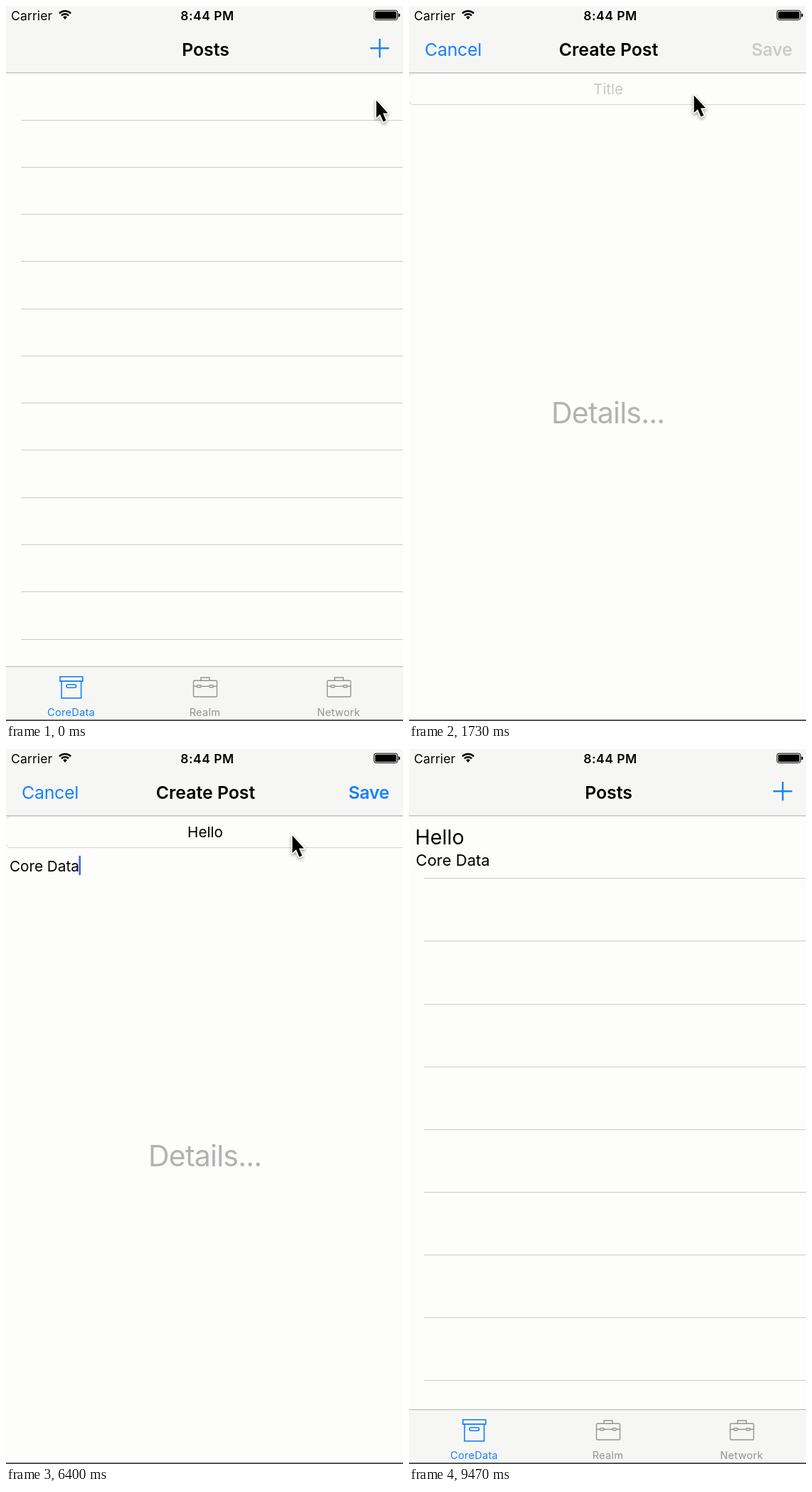
Write an HTML page with a canvas that moves like this. It is 558 px wide and 1004 px high and loops after 9540 ms.

```html
<!DOCTYPE html>
<html lang="en">
<head>
<meta charset="utf-8">
<title>Create a post</title>
<style>
  html, body { margin: 0; width: 100%; height: 100%; overflow: hidden; background: #fdfdfb; }
  canvas { display: block; width: 558px; height: 1004px; }
</style>
</head>
<body>
<canvas id="stage"></canvas>
<script>
const W = 558, H = 1004, LOOP = 9540, FPS = 0.015;
const BLUE = '#1780f8', GRAY = '#939393', BAR = '#f6f6f5', PAGE = '#fdfdfb', LINE = '#cbcbcd';
const OPEN = 752, CLOSE = 8250, TITLE_FOCUS = 2100, BODY_FOCUS = 4350;
const TITLE = { text: 'Hello', keys: [2900, 3150, 3350, 3550, 3780] };
const BODY = { text: 'Core Data', keys: [4750, 4950, 5120, 5280, 5420, 5600, 5720, 5830, 5930] };

// Pointer stops: time, x, y
const PATH = [
  [0, 520, 132], [150, 520, 132], [560, 524, 61], [1100, 524, 61], [1680, 400, 125],
  [2300, 402, 121], [6800, 402, 121], [7500, 510, 76], [8750, 510, 76], [9250, 590, 100]
];

const canvas = document.getElementById('stage');
const dpr = window.devicePixelRatio || 1;
canvas.width = W * dpr;
canvas.height = H * dpr;
const c = canvas.getContext('2d');

function text(str, x, y, size, { color = '#000', weight = 400, align = 'left', gap = 0 } = {}) {
  c.font = `${weight} ${size}px Inter, "Liberation Sans", sans-serif`;
  c.letterSpacing = gap * size + 'px';
  c.textAlign = align;
  c.fillStyle = color;
  c.fillText(str, x, y);
  return c.measureText(str).width;
}

function rect(x, y, w, h, color) {
  c.fillStyle = color;
  c.fillRect(x, y, w, h);
}

function box(x, y, w, h, r) {
  c.beginPath();
  c.roundRect(x, y, w, h, r);
}

function pen(color, width) {
  c.strokeStyle = color;
  c.lineWidth = width;
}

function segment(x1, y1, x2, y2) {
  c.beginPath();
  c.moveTo(x1, y1);
  c.lineTo(x2, y2);
  c.stroke();
}

function navTitle(str) {
  text(str, 280.5, 70, 24.8, { weight: 600, align: 'center' });
}

function statusBar() {
  text('Carrier', 7, 19.5, 17.5, { gap: 0.008 });
  text('8:44 PM', 283, 19.5, 17.5, { weight: 600, align: 'center', gap: 0.028 });
  pen('#000', 2.4);
  for (const r of [7.2, 11.4]) {
    c.beginPath();
    c.arc(83, 18.4, r, -Math.PI * 0.75, -Math.PI * 0.25);
    c.stroke();
  }
  c.fillStyle = '#000';
  c.beginPath();
  c.moveTo(83, 19);
  c.arc(83, 18.4, 4, -Math.PI * 0.75, -Math.PI * 0.25);
  c.fill();
  pen('#000', 1);
  box(517.2, 6.2, 33.3, 13.3, 3);
  c.stroke();
  box(518.8, 7.8, 30, 10.2, 1.5);
  c.fill();
  box(551.6, 10.4, 2.2, 5.2, [0, 2, 2, 0]);
  c.fill();
}

function archiveIcon() {
  pen(BLUE, 1.6);
  c.strokeRect(75.8, 941.8, 32, 6.4);
  c.strokeRect(78, 948.2, 27.6, 23.6);
  box(85, 952.8, 13.6, 4.4, 2.2);
  c.stroke();
}

function toolboxIcon(x) {
  pen(GRAY, 1.4);
  box(x - 16.5, 947.2, 33, 22.8, 1.5);
  c.stroke();
  c.beginPath();
  c.moveTo(x - 6, 947);
  c.lineTo(x - 6, 943);
  c.lineTo(x + 6, 943);
  c.lineTo(x + 6, 947);
  c.stroke();
  segment(x - 16.5, 955.3, x - 11.5, 955.3);
  segment(x - 6, 955.3, x + 6, 955.3);
  segment(x + 11.5, 955.3, x + 16.5, 955.3);
  for (const dx of [-11.5, 6]) {
    box(x + dx, 953.8, 5.5, 3, 1.2);
    c.stroke();
  }
}

function tabBar() {
  rect(0, 927, W, 77, BAR);
  rect(0, 927, W, 1.2, '#bdbdbd');
  archiveIcon();
  toolboxIcon(280);
  toolboxIcon(468);
  const tab = (name, x, color) => text(name, x, 997, 14.6, { color, align: 'center', gap: 0.018 });
  tab('CoreData', 91.5, BLUE);
  tab('Realm', 279.5, GRAY);
  tab('Network', 467.5, GRAY);
}

function listPage(saved) {
  rect(0, 0, W, H, PAGE);
  rect(0, 0, W, 94, BAR);
  rect(0, 93.2, W, 1.2, '#b8b8b8');
  navTitle('Posts');
  pen(BLUE, 2.4);
  segment(512, 59.3, 538.5, 59.3);
  segment(525.3, 46, 525.3, 72.5);

  const first = saved ? 181.3 : 159.6, step = saved ? 88.1 : 66.27;
  for (let y = first; y < 926; y += step) rect(21, Math.round(y), W, 1, LINE);
  if (saved) {
    text('Hello', 8.5, 134, 28.7);
    text('Core Data', 9.6, 164, 22);
  }
  tabBar();
}

const typed = (entry, t) => entry.text.slice(0, entry.keys.filter(k => k <= t).length);

function caretAlpha(t) {
  const events = [TITLE_FOCUS, BODY_FOCUS, ...TITLE.keys, ...BODY.keys].filter(k => k <= t);
  const u = (t - Math.max(...events)) % 1000;
  if (u < 500) return 1;
  if (u < 700) return (700 - u) / 200;
  return u < 850 ? 0 : (u - 850) / 150;
}

function caret(x, y, t) {
  c.globalAlpha = caretAlpha(t);
  rect(x, y, 2.6, 27, '#4468dc');
  c.globalAlpha = 1;
}

function createPage(t) {
  const title = typed(TITLE, t), body = typed(BODY, t);
  rect(0, -2, W, H + 2, PAGE);
  rect(0, -2, W, 96, BAR);
  rect(0, 93.2, W, 1.2, '#b8b8b8');
  text('Cancel', 22, 70, 24.8, { color: BLUE, gap: -0.008 });
  navTitle('Create Post');
  text('Save', 538.5, 70, 24.8, {
    color: body ? BLUE : '#cbcbcb', weight: 600, align: 'right', gap: -0.014
  });

  pen('#d6d6d6', 1);
  box(-0.5, 94.5, 568, 44, 7);
  c.stroke();
  const titleWidth = text(title || 'Title', 280, 123.7, 20.7, {
    color: title ? '#000' : '#c6c6c9', align: 'center'
  });
  text('Details...', 279.6, 586, 41, { color: '#b2b2b3', align: 'center', gap: -0.019 });
  const bodyWidth = text(body, 5, 171.7, 20.7);

  if (t >= BODY_FOCUS) caret(4.5 + bodyWidth, 150, t);
  else if (t >= TITLE_FOCUS) caret(279 + (title ? titleWidth / 2 : 0), 102, t);
}

// Critically damped spring: 1 at rest, falling to 0
function spring(ms) {
  const x = Math.max(0, ms) * 0.018;
  return (1 + x) * Math.exp(-x);
}

function pageOffset(t) {
  return H * (t < CLOSE ? spring(t - OPEN) : 1 - spring(t - CLOSE));
}

function pointerAt(t) {
  const i = PATH.findIndex(p => p[0] > t);
  if (i < 0) return PATH[PATH.length - 1].slice(1);
  const [t0, x0, y0] = PATH[i - 1], [t1, x1, y1] = PATH[i];
  const u = (t - t0) / (t1 - t0), e = u * u * (3 - 2 * u);
  return [x0 + (x1 - x0) * e, y0 + (y1 - y0) * e];
}

function pointer(t) {
  const [x, y] = pointerAt(t);
  if (x > W) return;
  c.save();
  c.translate(x, y);
  c.beginPath();
  c.moveTo(0.5, 0.5);
  for (const [px, py] of [[0.5, 25], [5.8, 20], [10.2, 30.5], [14.2, 28.8], [9.8, 18.6], [16.8, 18.4]]) {
    c.lineTo(px, py);
  }
  c.closePath();
  c.lineJoin = 'round';
  c.shadowColor = 'rgba(0,0,0,.4)';
  c.shadowBlur = 4 * dpr;
  c.shadowOffsetY = 2 * dpr;
  pen('#fff', 3.4);
  c.stroke();
  c.shadowColor = 'transparent';
  c.fillStyle = '#000';
  c.fill();
  c.restore();
}

function draw(t) {
  c.setTransform(dpr, 0, 0, dpr, 0, 0);
  listPage(t >= CLOSE);
  const y = pageOffset(t);
  if (y < H - 1) {
    c.save();
    c.translate(0, y);
    createPage(t);
    c.restore();
  }
  statusBar();
  rect(0, 1002, W, 2, '#545454');
  pointer(t);
}

// The picture advances at 15 steps a second
function tick() {
  const t = performance.now() % LOOP;
  draw(Math.floor(t * FPS + 0.1) / FPS);
  requestAnimationFrame(tick);
}
tick();
</script>
</body>
</html>
```
